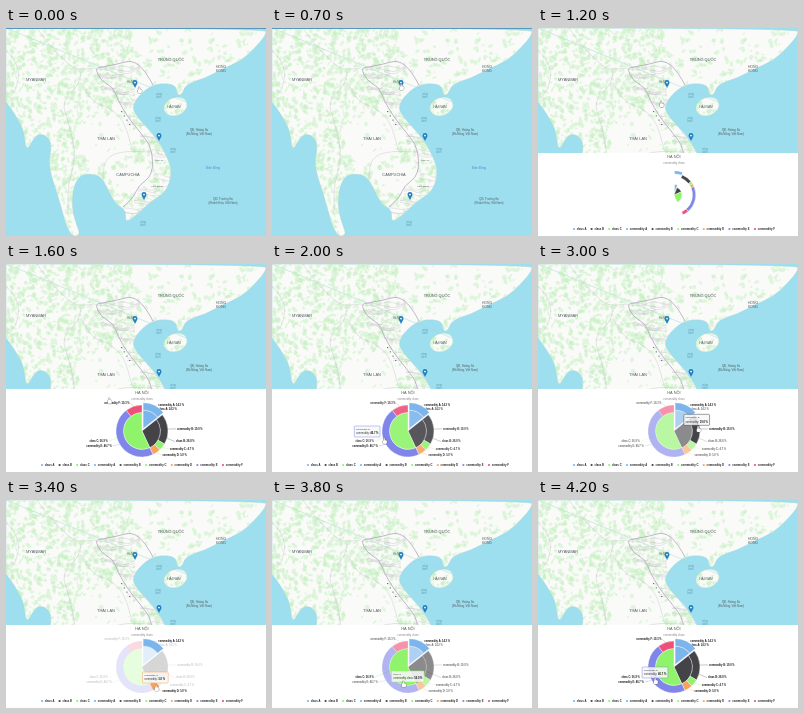
An HTML page with a canvas that plays this animation: 260x208 px, repeating every 4300 ms.

```html
<!DOCTYPE html>
<html lang="vi">
<head>
<meta charset="utf-8">
<title>Map and commodity chart</title>
<style>
html, body { margin: 0; width: 100%; height: 100%; overflow: hidden; background: #fff; }
canvas { display: block; width: 260px; height: 208px; }
</style>
</head>
<body>
<canvas id="stage"></canvas>
<script>
const W = 260, H = 208, LOOP = 4300;
const PANEL_AT = 900, GROW_AT = 950, GROW_TIME = 550, TIP_AT = 1900, TIP_LAG = 100;
const FONT = '"Liberation Sans", Arial, sans-serif';
const ratio = Math.max(1, window.devicePixelRatio || 1);
const ctx = prepare(document.getElementById('stage'));
const mapLayer = document.createElement('canvas');

function prepare(canvas) {
  canvas.width = W * ratio;
  canvas.height = H * ratio;
  const c = canvas.getContext('2d');
  c.scale(ratio, ratio);
  return c;
}

function text(c, str, x, y, size, color, align = 'center', weight = '') {
  c.font = `${weight} ${size}px ${FONT}`;
  c.fillStyle = color;
  c.textAlign = align;
  c.textBaseline = 'middle';
  c.fillText(str, x, y);
}

// Rounds off the corners of a polyline.
function curve(path, points) {
  path.moveTo(points[0], points[1]);
  let i = 2;
  for (; i < points.length - 2; i += 2) {
    const [x, y, nx, ny] = points.slice(i, i + 4);
    path.quadraticCurveTo(x, y, (x + nx) / 2, (y + ny) / 2);
  }
  path.lineTo(points[i], points[i + 1]);
}

function seeded(seed) {
  return () => (seed = seed * 16807 % 2147483647) / 2147483647;
}

// Linear motion through keys of the form [time, ...values].
function along(keys, t) {
  let i = 0;
  while (i < keys.length - 2 && t >= keys[i + 1][0]) i++;
  const [t0, ...a] = keys[i], [t1, ...b] = keys[i + 1];
  const u = Math.min(1, Math.max(0, (t - t0) / (t1 - t0)));
  return a.map((v, k) => v + (b[k] - v) * u);
}

// ---------- map ----------
const mainland = [
  0, 0, 260, 0, 260, 7, 249, 20, 235, 33, 216, 41, 200, 50, 180, 56, 176, 67, 171, 67,
  170, 57, 154, 55, 139, 61, 126, 77, 130, 88, 150, 109, 162, 130, 166, 145, 161, 163,
  144, 174, 131, 187, 119, 195, 120, 182, 109, 176, 101, 159, 94, 148, 85, 146, 74, 147,
  67, 160, 66, 180, 70, 195, 75, 208, 63, 208, 52, 168, 42, 138, 46, 116, 40, 107,
  30, 106, 20, 125, 18, 101, 6, 82, 0, 74
];
const vietnamBorder = [
  147, 57, 139, 42, 126, 32, 112, 36, 96, 39, 89, 40, 95, 53, 107, 59, 112, 72, 121, 88,
  134, 104, 146, 120, 147, 147, 132, 158, 128, 169, 117, 179
];
const otherBorders = [
  [0, 22, 14, 36, 11, 60, 3, 70],
  [31, 0, 40, 14, 58, 32, 70, 42, 89, 40],
  [75, 44, 74, 57, 55, 73, 64, 98, 70, 130, 62, 155, 62, 185],
  [75, 54, 85, 74, 101, 78, 118, 92, 126, 121],
  [97, 154, 96, 134, 112, 123, 147, 124]
];

const inside = (x, y, cx, cy, rx, ry) => Math.hypot((x - cx) / rx, (y - cy) / ry) < 1;

function greenery(x, y) {
  if (inside(x, y, 99, 112, 27, 25) || inside(x, y, 124, 150, 20, 17)) return .05;
  if (inside(x, y, 34, 62, 11, 38)) return .3;
  const clumps = .25 * Math.sin(x * .21 + 2 * Math.sin(y * .13));
  return (x > 128 && y < 75 ? .24 : .68) + clumps;
}

function strokeCurve(c, points, color, width) {
  c.beginPath();
  curve(c, points);
  c.strokeStyle = color;
  c.lineWidth = width;
  c.stroke();
}

function drawMap() {
  const c = prepare(mapLayer);
  const random = seeded(31);
  const land = new Path2D();
  curve(land, mainland);
  land.closePath();
  land.ellipse(169.5, 78.5, 12, 9, -.35, 0, 7);

  c.fillStyle = '#9ddfee';
  c.fillRect(0, 0, W, H);
  c.fillStyle = '#fafbf8';
  c.fill(land);
  c.strokeStyle = '#a5d3da';
  c.lineWidth = .5;
  c.stroke(land);

  c.save();
  c.clip(land);
  c.fillStyle = 'rgba(194,239,190,.48)';
  for (let i = 0; i < 5200; i++) {
    const x = random() * W, y = random() * H;
    if (random() > greenery(x, y)) continue;
    c.beginPath();
    c.ellipse(x, y, .8 + random() * 2.4, .7 + random() * 1.8, random() * 3, 0, 7);
    c.fill();
  }
  for (const border of otherBorders) strokeCurve(c, border, '#c3c2c9', .45);
  strokeCurve(c, vietnamBorder, '#a995bb', .7);
  // Province lines run from the inland border towards the coast.
  for (let i = 6; i < vietnamBorder.length; i += 2) {
    const x = vietnamBorder[i], y = vietnamBorder[i + 1];
    for (let k = 0; k < 3; k++) {
      const y0 = y + random() * 10;
      strokeCurve(c, [x, y0, x + 6, y0 + random() * 6 - 3, x + 13, y0 + 2,
        x + 22, y0 + random() * 10 - 5], '#c9bace', .4);
    }
  }
  c.restore();

  c.fillStyle = '#4c8060';
  for (let i = 0; i < 4; i++) c.fillRect(115 + i * 2.7, 83 + i * 4.3, 1.2, 1.1);

  for (const [label, x, y, size] of [
    ['MYANMAR', 30, 51.5, 4], ['TRUNG QUỐC', 165, 32, 3.9], ['THÁI LAN', 100, 111, 4],
    ['CAMPUCHIA', 122, 147, 3.9], ['HẢI NAM', 168, 79, 3.3], ['HONG', 215, 39, 3.4],
    ['KONG', 215, 43, 3.4], ['QĐ. Hoàng Sa', 193, 102.5, 2.8],
    ['(Đà Nẵng, Việt Nam)', 193, 106, 2.8], ['QĐ. Trường Sa', 217, 171.5, 2.8],
    ['(Khánh Hòa, Việt Nam)', 217, 175.5, 2.8], ['Hà Nội', 125, 54, 2.6],
    ['Gia Lai', 153, 132, 2.5], ['Lâm Đồng', 151, 158, 2.5]
  ]) text(c, label, x, y, size, '#505a5e');
  text(c, 'Biển Đông', 207, 140, 3, '#3f8fd0');
  for (const [x, y] of [[153, 66], [152, 90], [167, 121], [137, 194]]) {
    text(c, 'vùng', x, y, 2.6, '#5b93ac');
    text(c, 'biển', x, y + 3, 2.6, '#5b93ac');
  }
  for (const [x, y] of [[129, 60], [153, 113], [138, 172]]) drawPin(c, x, y);
}

function drawPin(c, x, y) {
  c.beginPath();
  c.moveTo(x, y);
  c.lineTo(x - 2.3, y - 4.5);
  c.arc(x, y - 5.5, 2.4, Math.PI, 0);
  c.lineTo(x + 2.3, y - 4.5);
  c.closePath();
  c.fillStyle = '#247fc1';
  c.fill();
  c.fillStyle = '#fff';
  c.beginPath();
  c.arc(x, y - 5.4, .9, 0, 7);
  c.fill();
}

// ---------- chart ----------
const CX = 136, CY = 167, INNER = 18.5, OUTER = 26, SLICED = 2.6;
const blue = '#7cb5ec', dark = '#434348', green = '#8ff36b';
const orange = '#f7a35c', purple = '#8085e9', pink = '#ed5078';

function ring(prefix, colors, ends) {
  return colors.map((color, i) => ({
    name: `${prefix} ${'ABCDEF'[i]}`, color, from: ends[i - 1] || 0, to: ends[i],
    outer: prefix === 'commodity'
  }));
}
const classes = ring('class', [blue, dark, green], [51.5, 155, 360]);
const goods = ring('commodity', [blue, dark, green, orange, purple, pink],
  [51.5, 120, 137, 155, 323, 360]);
const slices = [...classes, ...goods];

const radians = degrees => (degrees - 90) * Math.PI / 180;
const middle = item => radians((item.from + item.to) / 2);
const share = item => `${((item.to - item.from) / 3.6).toFixed(1)} %`;

function sliceAt([x, y]) {
  const r = Math.hypot(x - CX, y - CY);
  const angle = (Math.atan2(y - CY, x - CX) * 180 / Math.PI + 450) % 360;
  return (r < INNER ? classes : goods).find(item => angle < item.to);
}

function wedge(item, grow) {
  const start = radians(item.from * grow), end = radians(item.to * grow);
  const shift = item.from ? 0 : SLICED;
  const x = CX + Math.cos((start + end) / 2) * shift;
  const y = CY + Math.sin((start + end) / 2) * shift;
  ctx.beginPath();
  ctx.arc(x, y, item.outer ? INNER + (OUTER - INNER) * grow : INNER * grow, start, end);
  if (item.outer) ctx.arc(x, y, INNER, end, start, true);
  else ctx.lineTo(x, y);
  ctx.closePath();
  ctx.fillStyle = item.color;
  ctx.fill();
  ctx.strokeStyle = '#fff';
  ctx.lineWidth = .4;
  ctx.stroke();
}

function drawLabel(item) {
  const angle = middle(item), side = Math.cos(angle) > 0 ? 1 : -1;
  const radius = item.outer ? OUTER : INNER;
  const x = CX + Math.cos(angle) * 33;
  const y = CY + Math.sin(angle) * 29 + (item.outer ? 0 : 4);
  ctx.strokeStyle = item.color;
  ctx.lineWidth = .3;
  ctx.beginPath();
  ctx.moveTo(x + side, y);
  ctx.lineTo(CX + Math.cos(angle) * radius, CY + Math.sin(angle) * radius);
  ctx.stroke();
  text(ctx, `${item.name}: ${share(item)}`, x + side * 2, y, 2.55, '#111',
    side > 0 ? 'left' : 'right', 'bold');
}

const fadeKeys = [
  [2000, .1], [2300, .78], [2600, .78], [3000, .38], [3300, .78], [3700, .78], [3900, 0]
];

function drawChart(t) {
  const x = Math.min(1, Math.max(0, (t - GROW_AT) / GROW_TIME));
  const grow = .5 - Math.cos(Math.PI * x) / 2;
  const fade = t < TIP_AT ? 0 : along(fadeKeys, t)[0];
  const lit = [goods[0], sliceAt(pointer(t)), sliceAt(pointer(t - 150))];
  ctx.fillStyle = '#fff';
  ctx.fillRect(0, 125, W, H - 125);
  text(ctx, 'HÀ NỘI', 136, 129, 3.9, '#555');
  text(ctx, 'commodity class', 136, 135, 2.9, '#888');
  for (const item of slices) {
    ctx.globalAlpha = lit.includes(item) ? 1 : 1 - fade;
    if (x === 1) drawLabel(item);
    if (grow > 0) wedge(item, grow);
  }
  ctx.globalAlpha = 1;
  slices.forEach((item, i) => {
    const left = i < 3 ? 36 + i * 17.6 : 89 + (i - 3) * 25.6;
    ctx.fillStyle = item.color;
    ctx.beginPath();
    ctx.arc(left, 201, 1.1, 0, 7);
    ctx.fill();
    text(ctx, item.name, left + 2.8, 201, 2.75, '#222', 'left', 'bold');
  });
}

// ---------- pointer and tooltip ----------
const pointerKeys = [
  [0, 133, 61], [700, 129, 58], [1200, 123, 75], [1800, 93, 166], [1900, 95, 175],
  [2000, 112, 176], [2400, 142, 158], [2850, 158, 163], [3000, 160, 164],
  [3250, 149, 184], [3400, 150, 187], [4100, 117, 180], [4300, 117, 180]
];
const pointer = t => along(pointerKeys, t);

function drawTip(t) {
  const item = sliceAt(pointer(t));
  const [px, py] = pointer(t - TIP_LAG);
  const series = `${item.outer ? 'commodity' : 'commodity class'}: `;
  ctx.font = `2.65px ${FONT}`;
  const seriesWidth = ctx.measureText(series).width;
  const width = seriesWidth + 11.5, x = px - width / 2, y = py - 13;
  ctx.beginPath();
  ctx.roundRect(x, y, width, 11, .8);
  ctx.fillStyle = 'rgba(247,247,247,.88)';
  ctx.fill();
  ctx.strokeStyle = item.color;
  ctx.lineWidth = .5;
  ctx.stroke();
  text(ctx, item.name, x + 1.7, y + 3.2, 2.4, '#333', 'left');
  text(ctx, series, x + 1.7, y + 7.5, 2.65, '#333', 'left');
  text(ctx, share(item), x + 1.7 + seriesWidth, y + 7.5, 2.65, '#111', 'left', 'bold');
}

function drawHand(t) {
  const [x, y] = pointer(t);
  ctx.beginPath();
  ctx.roundRect(x - .5, y - 2, 1.2, 4, .6);
  ctx.roundRect(x - 1.2, y + .3, 4, 3.6, 1);
  ctx.strokeStyle = '#555';
  ctx.lineWidth = .7;
  ctx.stroke();
  ctx.fillStyle = '#fff';
  ctx.fill();
}

function frame() {
  const t = performance.now() % LOOP;
  ctx.drawImage(mapLayer, 0, 0, W, H);
  if (t < PANEL_AT) {
    ctx.fillStyle = '#5796bd';
    ctx.fillRect(0, 0, W, 1);
  } else {
    drawChart(t);
    if (t >= TIP_AT) drawTip(t);
  }
  drawHand(t);
  requestAnimationFrame(frame);
}

drawMap();
frame();
</script>
</body>
</html>
```
